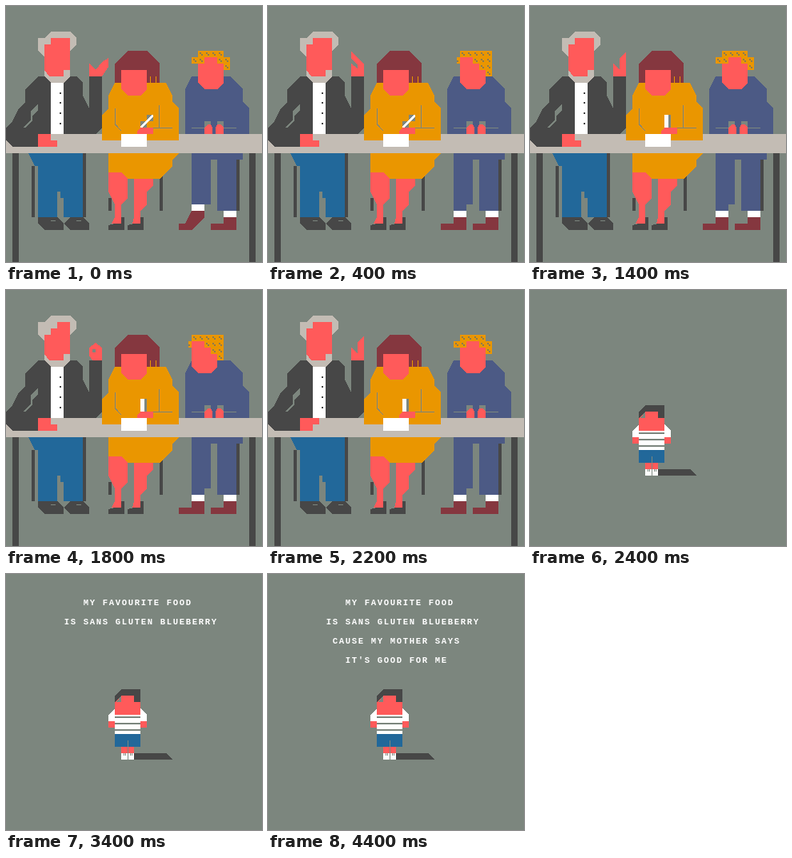
An HTML page that plays this animation: 320 by 320 pixels, repeating every 5.4 s.

```html
<!DOCTYPE html>
<html lang="en">
<head>
<meta charset="utf-8">
<title>Tasting panel</title>
<style>
  html, body { margin: 0; width: 100%; height: 100%; overflow: hidden; background: #7c867e; }
  svg { display: block; width: 100vw; height: 100vh; shape-rendering: crispEdges; }
  .bg { fill: #7c867e; }
  .dark { fill: #474747; }
  .skin { fill: #ff5a5a; }
  .white { fill: #fff; }
  .grey { fill: #c3bcb4; }
  .blue { fill: #22689a; }
  .navy { fill: #4c5a85; }
  .wine { fill: #85373f; }
  .dress { fill: #ea9600; }
  .curls { fill: url(#curl); }
  .seam { fill: none; stroke: #7c867e; stroke-width: 1; }
  text {
    fill: #fff;
    font: bold 10.6px "Liberation Mono", monospace;
    letter-spacing: calc(8px - .6em);
    white-space: pre;
  }
</style>
</head>
<body>
<svg viewBox="0 0 320 320">
  <defs>
    <pattern id="curl" width="8" height="8" patternUnits="userSpaceOnUse">
      <path fill="#ea9600" d="M0 0h8v8h-8z"/>
      <path fill="#8a7a50" d="M2 2h2v2h2v2h-2v-2h-2z"/>
    </pattern>
  </defs>

  <g id="panel">
    <!-- table and chairs -->
    <path class="dark" d="M8 184h8v136h-8zM304 184h8v136h-8zM32 200h4v64h-4zM96 184h4v80h-4z
      M128 240h4v16h-4zM192 208h4v48h-4zM288 192h4v64h-4z"/>
    <path class="grey" d="M0 160h320v24H0z"/>

    <!-- man -->
    <path class="blue" d="M28 184H96V264H72V240H68V232H64V264H40V200H36z"/>
    <path class="dark" d="M40 264H64L72 272L80 264H96L104 272V280H80L72 272V280H48L40 272z"/>
    <path class="seam" d="M56 268.5h6M88 268.5h6"/>
    <path class="dark" d="M40 88H88L96 96V112L104 128V88H120V152L112 160H40V176H8L0 168V152L8 144L16 128L24 120V104L32 96z"/>
    <path class="bg" d="M40 122V130L33 138V144L24 152H22L31 142V132z"/>
    <path class="white" d="M56 96h16v64h-16z"/>
    <path class="dark" d="M67 108h2v2h-2zM67 120h2v2h-2zM67 133h2v2h-2zM67 146h2v2h-2z"/>
    <path class="grey" d="M40 40H48L56 32H80L88 40V48L80 56V88L72 96H56L48 88V64L40 56z"/>
    <path class="skin" data-on="01245" d="M48 48H56V40H80V80H72V88H54L48 80z"/>
    <path class="skin" data-on="3" d="M48 56H56V48H64V40H80V80H72V88H54L48 80z"/>
    <path class="skin" data-on="01234" d="M40 160H56V168H64V176H40z"/>
    <path class="skin" data-on="5" d="M40 160H64V168H56V176H40z"/>

    <!-- raised hand -->
    <path class="skin" data-on="0" d="M104 72L112 80L120 70L128 65V76L120 88H104z"/>
    <path class="skin" data-on="15" d="M104 72L112 80V65L120 57V88H104z"/>
    <path class="skin" data-on="24" d="M104 57L120 72V88H104V72L112 78V74L104 66z"/>
    <path class="skin" data-on="3" d="M104 72L112 66L120 72V88H108L104 82z"/>
    <path class="bg" data-on="3" d="M108 74h4v4h-4z"/>

    <!-- woman -->
    <path class="skin" d="M128 208H144L152 216V240L144 248V272H132L136 264V248L128 232z
      M160 212H184V224L176 232V248L168 256V272H158L160 264z"/>
    <path class="dark" d="M128 280V274L136 272H144V264H148V280zM152 280V274L160 272H168V264H172V280z"/>
    <path class="dress" d="M128 184H216L208 192V200L192 216H152L144 208H128z"/>
    <path class="dress" d="M136 96H200L208 112V120L216 128V168H120V136L128 128V112z"/>
    <path class="seam" d="M136.5 128V148L144 156M191.5 124V152M184 152.5H208"/>
    <path class="wine" d="M136 72L152 56H176L192 72V96H136z"/>
    <path class="skin" d="M144 80H176V104L168 112H152L144 104z"/>
    <path class="dress" d="M180 88h1v8h-1zM187 88h1v8h-1z"/>
    <path class="white" d="M144 160h32v16h-32z"/>
    <path class="skin" d="M164 160V156L168 152H184V160z"/>
    <g data-on="024">
      <path class="bg" d="M168 144h8v8h-8zM176 136h8v8h-8z"/>
      <path class="white" d="M168 150L182 136H184V138L170 152H168z"/>
    </g>
    <g data-on="135">
      <path class="bg" d="M168 136h8v16h-8z"/>
      <path class="white" d="M168 136h5v16h-5z"/>
    </g>

    <!-- boy -->
    <path class="navy" d="M232 184H296V192H288V256H264V192H256V248H232z"/>
    <path class="wine" d="M256 272H272V264H288V280H256z"/>
    <path class="white" d="M272 256h16v8h-16z"/>
    <g data-on="0">
      <path class="white" d="M232 248h16v8h-16z"/>
      <path class="wine" d="M232 256H248V264L232 280H216V272H224z"/>
    </g>
    <g data-on="12345">
      <path class="navy" d="M232 248h16v8h-16z"/>
      <path class="white" d="M232 256h16v8h-16z"/>
      <path class="wine" d="M216 272H232V264H248V280H216z"/>
    </g>
    <path class="navy" d="M224 104L232 88H280L296 104V120L304 128V160H224z"/>
    <path class="seam" d="M232 152.5H248M272 152.5H288"/>
    <path class="bg" d="M248 144h8v8h-8zM264 144h8v8h-8z"/>
    <path class="skin" d="M248 160V152L252 148H256L258 152V160zM262 160V152L264 148H268L272 152V160z"/>
    <g data-on="015">
      <path class="skin" d="M240 64H272V96L264 104H248L240 96z"/>
      <path class="curls" d="M240 56H272V64H280V80H272V72H264V64H248V72H232V64H240z"/>
    </g>
    <g data-on="24">
      <path class="skin" d="M240 64H272V96L264 104H248L240 96z"/>
      <path class="curls" d="M240 56H280V88H272V80H264V72H256V64H240V72H236V64H240z"/>
    </g>
    <g data-on="3">
      <path class="skin" d="M232 64H264V96L256 104H240L232 96z"/>
      <path class="curls" d="M232 56H272V88H264V80H256V72H248V64H232V72H228V64H232z"/>
    </g>
  </g>

  <g id="solo">
    <path class="dark" d="M136 152L144 144H168V160H136zM160 224H200L208 232H160z"/>
    <path class="skin" d="M136 160L144 152H160V160H168V176H136zM128 184h8v8h-8zM168 184h8v8h-8z
      M144 216h16v8h-16z"/>
    <path class="dark" d="M136 152H144L136 160z"/>
    <path class="bg" d="M144 152V160H138z"/>
    <path class="white" d="M136 168V184H128V176zM168 168L176 176V184H168zM136 176h32v24h-32z
      M144 224h16v8h-16z"/>
    <path class="skin" d="M136 168h32v8h-32z"/>
    <path class="bg" d="M136 178h32v2h-32zM136 186h32v2h-32zM136 194h32v2h-32z"/>
    <path class="blue" d="M136 200h32v16h-32z"/>
    <path class="bg" d="M152 208h1v24h-1zM147 224h1v3h-1zM149 224h1v3h-1zM155 224h1v3h-1zM157 224h1v3h-1z"/>
    <text x="96.8" y="39">MY FAVOURITE FOOD</text>
    <text x="72.8" y="63">IS SANS GLUTEN BLUEBERRY</text>
    <text x="80.8" y="87">CAUSE MY MOTHER SAYS</text>
    <text x="96.8" y="111">IT′S GOOD FOR ME</text>
  </g>
</svg>
<script>
  const LOOP = 5400, CUT = 2400, POSE = 200, POSES = 6, LINE = 500;
  const panel = document.getElementById('panel');
  const solo = document.getElementById('solo');
  const parts = panel.querySelectorAll('[data-on]');
  const lines = solo.querySelectorAll('text');
  const show = (el, on) => { el.style.display = on ? '' : 'none'; };

  function draw() {
    const t = performance.now() % LOOP;
    const pose = Math.floor(t / POSE) % POSES;
    show(panel, t < CUT);
    show(solo, t >= CUT);
    parts.forEach(part => show(part, part.dataset.on.includes(pose)));
    lines.forEach((line, i) => show(line, t >= CUT + LINE * (i + 1)));
    requestAnimationFrame(draw);
  }
  draw();
</script>
</body>
</html>
```
